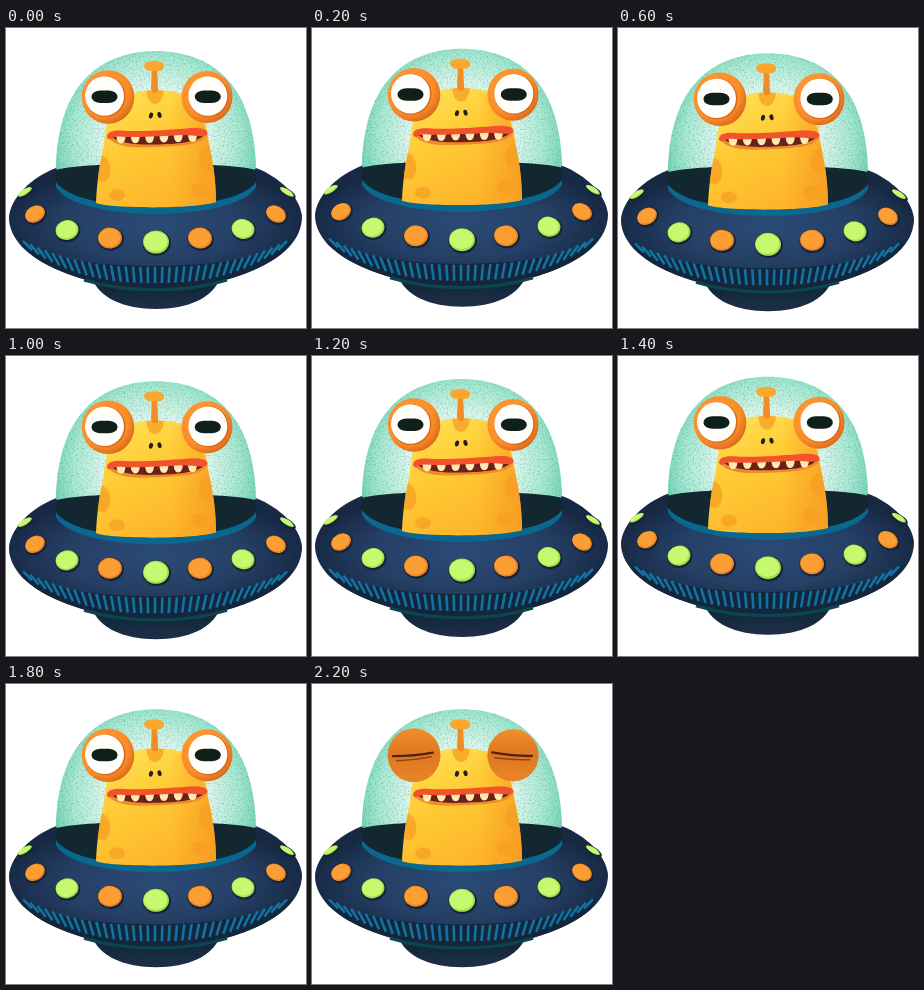
Animation of 300x300 px, one loop 2.4 s. Source, as an HTML page:

```html
<!DOCTYPE html>
<html lang="en">
<head>
<meta charset="utf-8">
<title>Alien in a saucer</title>
<style>
  html, body { margin: 0; width: 100%; height: 100%; overflow: hidden; background: #fff; }
  svg { display: block; width: 100vw; height: 100vh; }
</style>
</head>
<body>
<svg viewBox="0 0 300 300">
  <defs>
    <radialGradient id="glass" gradientUnits="userSpaceOnUse" cx="150" cy="112" r="106">
      <stop offset="0" stop-color="#f4fdf8"/>
      <stop offset=".5" stop-color="#dcf7ec"/>
      <stop offset=".78" stop-color="#a9ead3"/>
      <stop offset="1" stop-color="#6fd2b4"/>
    </radialGradient>
    <linearGradient id="skin" gradientUnits="userSpaceOnUse" x1="120" y1="62" x2="175" y2="180">
      <stop offset="0" stop-color="#ffe052"/>
      <stop offset=".4" stop-color="#ffcb35"/>
      <stop offset="1" stop-color="#fdb229"/>
    </linearGradient>
    <linearGradient id="cheek" gradientUnits="userSpaceOnUse" x1="165" y1="0" x2="210" y2="0">
      <stop offset="0" stop-color="#f6961f" stop-opacity="0"/>
      <stop offset="1" stop-color="#f6961f" stop-opacity=".7"/>
    </linearGradient>
    <radialGradient id="socket" cx=".4" cy=".38" r=".66">
      <stop offset="0" stop-color="#ffa038"/>
      <stop offset=".72" stop-color="#fb8d29"/>
      <stop offset="1" stop-color="#d9681b"/>
    </radialGradient>
    <linearGradient id="lid" x1="0" x2="0" y1="0" y2="1">
      <stop offset="0" stop-color="#f08f2b"/>
      <stop offset=".48" stop-color="#de7722"/>
      <stop offset="1" stop-color="#ea8526"/>
    </linearGradient>
    <radialGradient id="hull" gradientUnits="userSpaceOnUse" cx="149" cy="197" r="150" gradientTransform="translate(0 118) scale(1 .4)">
      <stop offset="0" stop-color="#2c4b78"/>
      <stop offset=".6" stop-color="#263f66"/>
      <stop offset="1" stop-color="#182844"/>
    </radialGradient>
    <linearGradient id="belly" gradientUnits="userSpaceOnUse" x1="0" x2="0" y1="250" y2="281">
      <stop offset="0" stop-color="#0d2630"/>
      <stop offset=".4" stop-color="#14283c"/>
      <stop offset="1" stop-color="#202d48"/>
    </linearGradient>
    <filter id="grain" x="0" y="0" width="1" height="1" color-interpolation-filters="sRGB">
      <feTurbulence type="fractalNoise" baseFrequency=".6" numOctaves="2" seed="4"/>
      <feColorMatrix values="0 0 0 0 .06  0 0 0 0 .3  0 0 0 0 .32  .7 0 0 0 -.34"/>
      <feComposite in2="SourceGraphic" operator="in" result="specks"/>
      <feMerge><feMergeNode in="SourceGraphic"/><feMergeNode in="specks"/></feMerge>
    </filter>
  </defs>

  <g id="ship">
    <path fill="url(#glass)" filter="url(#grain)" d="M50 160C48 113 57 75 78 52C97 31 124 23 149 23C177 23 203 31 222 52C243 75 252 113 250 160Z"/>

    <g filter="url(#grain)">
      <path fill="url(#belly)" d="M86 250C93 270 118 281 150 281C182 281 207 270 214 250Z"/>
      <path fill="url(#hull)" d="M50 140C26 149 4 170 3 190C3 200 8 210 16 219C28 231 44 239 62 246C88 256 118 262 149 262C181 262 212 256 238 246C256 239 272 231 284 218C292 209 296 199 296 188C294 169 274 149 250 140Q230 182 149 182T50 140Z"/>
    </g>
    <path fill="#12272f" d="M50 142C70 137 100 136 149 136S230 137 250 142V158C240 175 205 182 149 182S60 175 50 158Z"/>
    <path fill="#0a6790" d="M50 159C60 177 105 186 149 186S240 177 250 159V154C238 170 200 178 149 178S62 170 50 154Z"/>
    <path id="shadow" fill="#14263b" d="M13 212C30 228 85 238 149 238S269 228 286 211C280 228 256 239 238 246C181 266 118 266 62 246C44 239 22 229 13 212Z"/>
    <path fill="none" stroke="#0d454f" stroke-width="3" d="M78 252C120 265 180 265 221 252"/>
    <g id="hatch" stroke="#1073a2" stroke-width="2.6"></g>
    <g id="lamps"></g>

    <path id="body" fill="url(#skin)" d="M90 175C91 152 94 134 98 117C99 99 104 78 117 69C132 60 168 60 184 69C196 78 201 98 203 116C207 134 210 152 210 174C191 181 108 181 90 175Z"/>
    <path fill="url(#cheek)" d="M165 64Q196 72 203 116C207 134 210 152 210 174Q192 178 165 179Z"/>
    <g fill="#f79f24" opacity=".75">
      <path d="M96 127C106 131 107 148 99 154L92 153Q93 138 96 127Z"/>
      <ellipse cx="111" cy="167" rx="8" ry="6"/>
      <path d="M203 118C192 120 189 134 197 141L208 145Q206 130 203 118Z"/>
      <ellipse cx="193" cy="162" rx="8" ry="7"/>
      <path d="M140 63Q142 76 149 76T158 63Q149 61 140 63Z"/>
    </g>
    <path fill="#f18c26" d="M146 40H151L152 60Q153 65 149 65T145 60Z"/>
    <path fill="#fba62e" d="M138 37Q140 33 148 33T158 37Q159 42 153 43H144Q138 42 138 37Z"/>

    <g fill="#251f19">
      <ellipse cx="145" cy="87.5" rx="2" ry="3" transform="rotate(15 145 87.5)"/>
      <ellipse cx="153.5" cy="87" rx="2" ry="3" transform="rotate(-15 153.5 87)"/>
    </g>

    <path fill="#ee8a2a" d="M102 110C112 120 130 120 150 119S196 118 201 107Z"/>
    <path fill="#6b2117" d="M105 109C116 116 132 117 150 116.500S193 115 199 106Z"/>
    <g id="teeth" fill="#ffeab4"></g>
    <path fill="#f2522c" d="M101 109C101 104 107 102 115 102.500C135 104 160 102 180 100.500C192 99.500 202 100 201.500 106C200 110 188 107 176 107C156 108 130 110 114 108.500C106 108 103 114 101 109Z"/>
    <g id="eyes"></g>
  </g>
</svg>
<script>
const FRAME = 200, LOOP = 2400;
const BOB_STEPS = 6, BOB_RISE = 2.3;
const $ = id => document.getElementById(id);

const ellipse = (x, y, rx, ry, fill, turn = 0) =>
  `<ellipse cx="${x}" cy="${y}" rx="${rx}" ry="${ry}" fill="${fill}" transform="rotate(${turn} ${x} ${y})"/>`;

// Slanted ribs under the rim, converging towards the middle.
const RIBS = 18;
let ribs = '';
for (let i = -RIBS; i <= RIBS; i++) {
  const u = i / RIBS, sag = Math.abs(u) ** 2.5;
  ribs += `<path d="M${149 + 132 * u} ${239 - 26 * sag}l${-9 * u} ${16 - 7 * sag}"/>`;
}
$('hatch').innerHTML = ribs;

const lamp = (x, y, rx, ry, turn, i) => {
  const [base, light] = i % 2 ? ['#ec8423', '#fb9f34'] : ['#a5dc4c', '#c6f870'];
  return ellipse(x + .7, y + 1, rx + 1.2, ry + 1.2, '#14233a', turn) +
    ellipse(x, y, rx, ry, base, turn) +
    ellipse(x - .5, y - .5, rx * .9, ry * .88, light, turn);
};
$('lamps').innerHTML = [
  [19, 164, 8, 2.6, -32], [29, 186, 10.5, 8, -30], [61, 202, 11.5, 10, -12], [104, 210, 12, 10.5, -4],
  [150, 214, 13, 11.5, 0],
  [194, 210, 12, 10.5, 4], [237, 201, 11.5, 10, 12], [270, 186, 10.5, 8, 30], [281, 164, 8, 2.6, 32]
].map((spot, i) => lamp(...spot, i)).join('');

const TEETH = 6;
$('teeth').innerHTML = Array.from({ length: TEETH }, (_, i) => {
  const x = 115 + 14.3 * i, top = 107 - .3 * i;
  return `<path d="M${x - 4.5} ${top}h9q0 8.500 -4.500 8.500t-4.500 -8.500z"/>`;
}).join('');

const eye = (x, y, r, look, tilt) => `
  ${ellipse(x, y, r, r + .5, 'url(#socket)')}
  <g class="open">
    ${ellipse(x + look + .7, y - .5, 20.3, 20.5, '#d9681b')}
    ${ellipse(x + look, y - 1, 19.5, 19.8, '#fffefa')}
    <rect x="${x + look - 13}" y="${y - 6.5}" width="26" height="12.5" rx="9" ry="6" fill="#0e2019"/>
  </g>
  <g class="shut" fill="none" stroke-linecap="round">
    ${ellipse(x, y, r, r + .5, 'url(#lid)')}
    <g transform="rotate(${tilt} ${x} ${y})">
      <path stroke="#4f2410" stroke-width="2.3" d="M${x - 21} ${y - 1}Q${x} ${y + 1} ${x + 19} ${y - 1}"/>
      <path stroke="#8e4313" stroke-width="1.5" d="M${x - 18} ${y + 4}Q${x} ${y + 5} ${x + 17} ${y + 3}"/>
    </g>
  </g>`;
$('eyes').innerHTML = eye(102, 69, 26.3, -3.5, -5) + eye(201, 69, 25.5, .8, 5);

const openParts = document.querySelectorAll('.open');
const shutParts = document.querySelectorAll('.shut');
const show = (parts, on) => parts.forEach(p => p.setAttribute('visibility', on ? 'visible' : 'hidden'));

// Stepped triangle wave: up one, back, then down two and back.
const bob = step => BOB_RISE * (Math.abs((step + 2) % BOB_STEPS - 3) - 1);

function draw(ms) {
  const step = Math.floor((ms % LOOP) / FRAME);
  const blink = step === LOOP / FRAME - 1;
  $('ship').setAttribute('transform', `translate(0 ${bob(step)})`);
  show(openParts, !blink);
  show(shutParts, blink);
}

let start;
function tick(now) {
  start ??= now;
  draw(now - start);
  requestAnimationFrame(tick);
}
draw(0);
requestAnimationFrame(tick);
</script>
</body>
</html>
```
